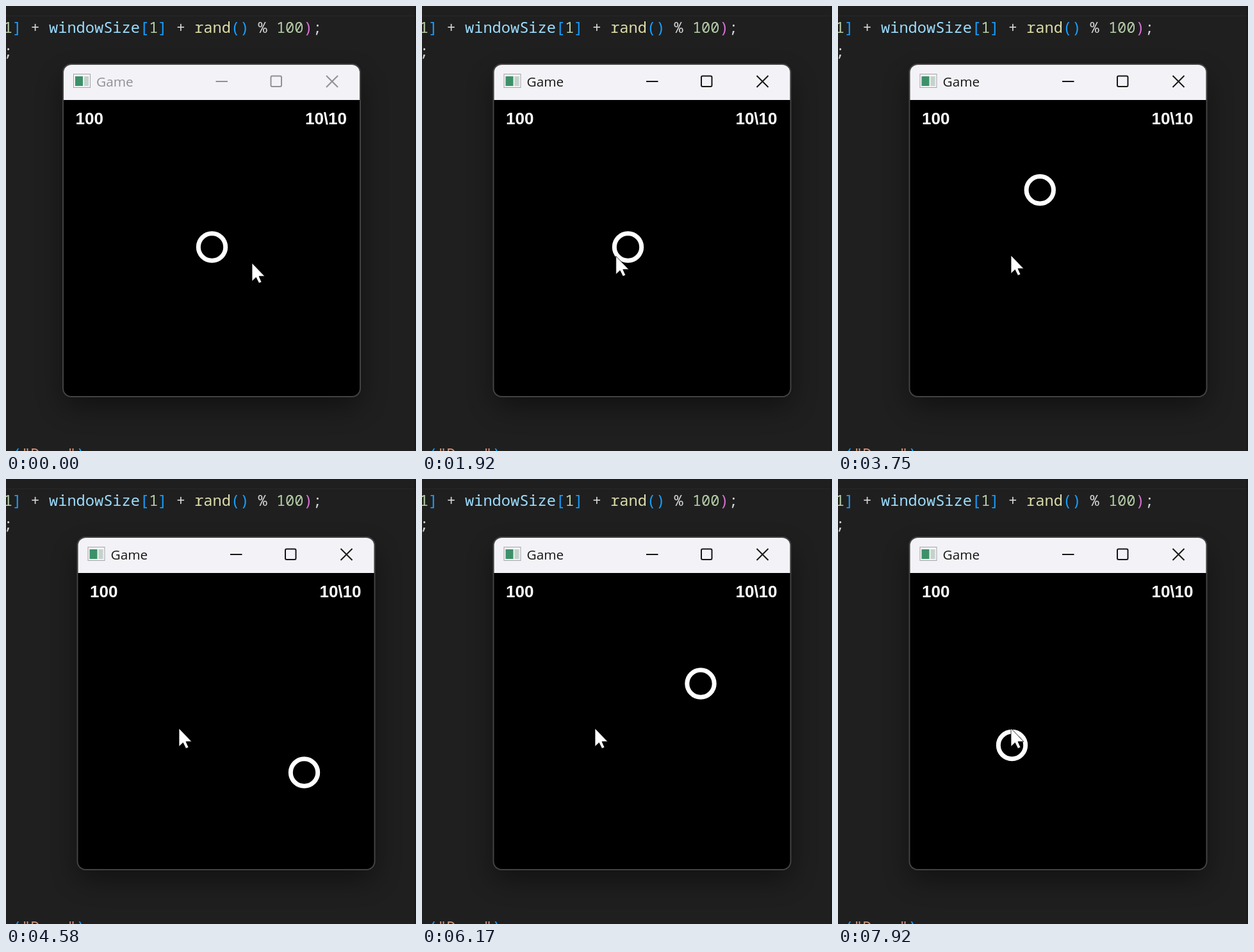
These frames come from a looping animation (640 by 696 pixels, 8000 ms). An HTML page:

```html
<!DOCTYPE html>
<html lang="en">
<head>
<meta charset="utf-8">
<title>Game</title>
<style>
  html, body { margin: 0; width: 100%; height: 100%; overflow: hidden; background: #1f1f1f; }
  svg { display: block; width: 100vw; height: 100vh; }
  text { white-space: pre; }
  .code { font: 500 23.67px "Noto Sans Mono", monospace; fill: #d4d4d4; }
  .num { fill: #b5cea8; }
  .var { fill: #9cdcfe; }
  .fn { fill: #dcdcaa; }
  .blue { fill: #179fff; }
  .pink { fill: #da70d6; }
  .str { fill: #ce9178; }
  .title { font: 20.8px "Open Sans", sans-serif; }
  .hud { font: bold 26px "Liberation Sans", Arial, sans-serif; fill: #fff; }
</style>
</head>
<body>
<svg viewBox="0 0 640 696">
  <defs>
    <clipPath id="frameClip"><rect class="wide" y="92" height="518" rx="12"/></clipPath>
    <clipPath id="fieldClip"><rect class="wide" y="147" height="463"/></clipPath>
    <filter id="blur" x="-30%" y="-30%" width="160%" height="160%"><feGaussianBlur stdDeviation="22"/></filter>
  </defs>

  <rect width="640" height="696" fill="#1f1f1f"/>
  <path d="M0 15.5H638" stroke="#282828"/>
  <path d="M638.5 0V696" stroke="#141414"/>
  <rect class="wide" y="112" height="514" rx="12" opacity=".45" filter="url(#blur)"/>
  <g class="code">
    <text x="-4" y="42"><tspan class="num">1</tspan><tspan class="blue">]</tspan> + <tspan class="var">windowSize</tspan><tspan class="blue">[</tspan><tspan class="num">1</tspan><tspan class="blue">]</tspan> + <tspan class="fn">rand</tspan><tspan class="blue">()</tspan> % <tspan class="num">100</tspan><tspan class="pink">)</tspan>;</text>
    <text x="-4" y="79">;</text>
    <text x="10" y="709"><tspan class="blue">(</tspan><tspan class="str">"Demo"</tspan><tspan class="blue">)</tspan></text>
  </g>

  <rect class="wide" y="92" height="518" rx="12" stroke="#424242" stroke-width="4"/>
  <g clip-path="url(#frameClip)">
    <rect width="640" height="696"/>
    <rect y="92" width="640" height="55" fill="#f3f3f7"/>
  </g>

  <g id="leftSide">
    <rect x="15.5" y="106.5" width="26" height="21" fill="#f4f4f4" stroke="#a4a4a8"/>
    <rect x="18" y="110" width="12" height="15" fill="#3c9168"/>
    <rect x="32" y="110" width="7" height="15" fill="#c4d2cc"/>
    <text id="title" class="title" x="51" y="126">Game</text>
    <text class="hud" x="18.500" y="185">100</text>
  </g>
  <g id="buttons" fill="none" stroke-width="2">
    <path d="M-224.500 118H-206"/>
    <rect x="-138.500" y="109.500" width="16.500" height="16.500" rx="2"/>
    <path d="M-52 109L-34 127M-34 109L-52 127"/>
  </g>
  <text id="ammo" class="hud" x="-20" y="185" text-anchor="end">10\10</text>

  <g clip-path="url(#fieldClip)" fill="#fff">
    <g id="debris"></g>
    <circle id="ring" r="21.200" fill="none" stroke="#fff" stroke-width="7"/>
  </g>
  <path id="pointer" d="M0 0V28.500L6.300 22.500L10.800 31.500L15 29.800L11 20.800H20Z"
        fill="#fff" stroke="#000" stroke-width=".8"/>
</svg>
<script>
const LOOP = 8000, RATE = 12;
const $ = id => document.getElementById(id);
const wide = document.querySelectorAll(".wide");

// Turning points of the player: tick, x, y.
const route = [[28, 321.5, 377], [35, 122, 538], [46, 339, 272], [51, 485, 345],
  [55, 465.5, 459], [62, 225, 392], [67, 312.5, 277], [74, 435, 320],
  [82, 345.5, 486.5], [88, 425, 420], [95, 271.5, 416.5]];

const pieces = [[-13, -35, 14], [-39, -11, 14], [-38, 31, 8]].map(([dx, dy, size]) => {
  const node = document.createElementNS("http://www.w3.org/2000/svg", "rect");
  $("debris").append(node);
  return { dx, dy, size, node };
});

const set = (node, attrs) => {
  for (const name in attrs) node.setAttribute(name, attrs[name]);
};
const move = (node, x, y = 0) => set(node, { transform: `translate(${x} ${y})` });
const ramp = (tick, from, to) => Math.min(1, Math.max(0, (tick - from) / (to - from)));

// A hit pushes the right wall out, then both walls close in again.
const shrink = tick => 22.5 * ramp(tick, 13, 17);
const leftWall = tick => 90 + shrink(tick);
const rightWall = tick => 552 + 45 * ramp(tick, 11, 14) - shrink(tick);

// Smooth curve through the turning points.
function player(tick) {
  const last = route.length - 1;
  const t = Math.min(Math.max(tick, route[0][0]), route[last][0]);
  const i = Math.max(0, route.findIndex(key => key[0] >= t) - 1);
  const a = route[i], b = route[i + 1];
  const span = b[0] - a[0], u = (t - a[0]) / span, w = 1 - u;
  return [1, 2].map(c => {
    const slope = j => {
      const p = route[Math.max(j - 1, 0)], q = route[Math.min(j + 1, last)];
      return (q[c] - p[c]) / (q[0] - p[0]) * span;
    };
    return a[c] * (1 + 2 * u) * w * w + slope(i) * u * w * w
      + b[c] * u * u * (3 - 2 * u) - slope(i + 1) * u * u * w;
  });
}

function drawDebris(tick) {
  const visible = tick >= 13;
  const reach = (tick - 12) / 2;
  for (const { dx, dy, size, node } of pieces) {
    const side = visible ? size * (1 - ramp(tick, 14, 18)) : 0;
    set(node, {
      x: 555 + dx * reach - side / 2,
      y: 405 + dy * reach - side / 2,
      width: side, height: side
    });
  }
}

function draw(time) {
  // A few ms of lead line the steps up with whole hundredths of a second.
  const tick = Math.floor((time % LOOP + 4) * RATE / 1000) % (LOOP * RATE / 1000);
  const left = leftWall(tick), right = rightWall(tick);
  for (const node of wide) set(node, { x: left, width: right - left });
  move($("leftSide"), left);
  move($("buttons"), right);
  move($("ammo"), rightWall(tick - 0.7)); // trails the wall slightly

  const ink = tick < 7 ? "#919195" : "#161616";
  set($("title"), { fill: ink });
  set($("buttons"), { stroke: ink });

  const sweep = ramp(tick, 17, 25);
  move($("pointer"),
    384 + 17 * ramp(tick, 0, 3) - 131 * sweep,
    402 - 7 * ramp(tick, 7, 11) - 5 * sweep);
  move($("ring"), ...player(tick));
  drawDebris(tick);
}

const start = performance.now();
function loop() {
  draw(performance.now() - start);
  requestAnimationFrame(loop);
}
loop();
</script>
</body>
</html>
```
